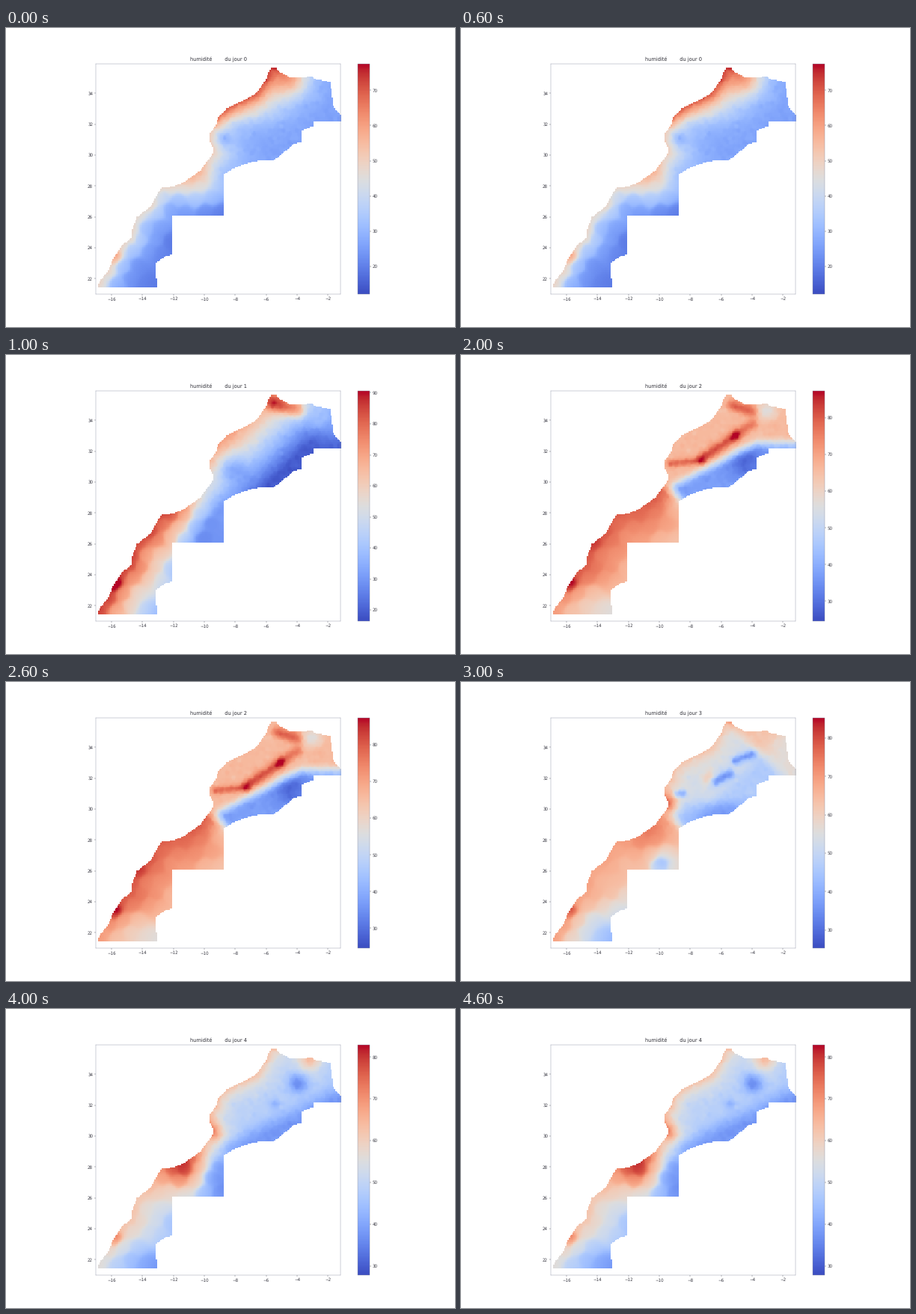
These frames come from a looping animation (600x400 px, 5000 ms). A matplotlib script:

```python
import numpy as np
import matplotlib.pyplot as plt
from matplotlib.animation import FuncAnimation
from matplotlib.path import Path

EXTENT = (-17.02, -1.2, 21.0, 35.9)
LEFT, RIGHT, TOP, BOTTOM = 120, 447, 48, 356   # plot area in stage pixels
CELLS = 205

rng = np.random.default_rng(4)

# Key points of the outline in stage pixels: coast going north, land border back.
COAST = np.array([
    (123, 344), (131, 331), (136, 326), (144, 307), (155, 291), (167, 281),
    (168, 270), (175, 253), (194, 238), (207, 214), (222, 212), (238, 206),
    (259, 191), (276, 168), (276, 160), (272, 153), (272, 140), (280, 131),
    (283, 119), (296, 106), (332, 89), (346, 70), (353, 53), (360, 52)], float)
BORDER = np.array([
    (362, 57), (378, 65.5), (397, 66), (408, 64), (412, 68), (432, 72),
    (437, 106), (448, 118), (448, 124.5), (411, 124.5), (411, 131), (394, 137),
    (395, 152.5), (384, 155), (357, 177.5), (340, 177), (325, 180), (305, 187),
    (291.3, 195), (291.3, 250.5), (222.5, 250.5), (222.5, 303), (212, 306),
    (199, 315), (201.5, 346.5), (124, 346.5)])
OUTLINE = Path(np.vstack([COAST, BORDER]))


def distances(a, b):
    return np.hypot(a[:, None, 0] - b[None, :, 0], a[:, None, 1] - b[None, :, 1])


def ramp(value, low, high):
    t = np.clip((value - low) / (high - low), 0, 1)
    return t * t * (3 - 2 * t)


class Terrain:
    """Points on the map with what the weather depends on there."""

    def __init__(self, pts):
        self.x, self.y = pts.T
        self.across = self.x + self.y              # grows towards the desert
        self.along = self.x - self.y               # grows towards the north-east
        knots = np.arange(len(COAST))
        fine = np.linspace(0, knots[-1], 150)
        shore = np.column_stack([np.interp(fine, knots, c) for c in COAST.T])
        self.coast = distances(pts, shore).min(axis=1)
        self.north = ramp(self.along, 85, 115)
        self.cape = 20 * self.blob(147, 304, 6)

    def blob(self, x, y, r):
        return np.exp(-((self.x - x) ** 2 + (self.y - y) ** 2) / (2 * r * r))

    def ridge(self, x0, y0, x1, y1, width):
        dx, dy = x1 - x0, y1 - y0
        t = ((self.x - x0) * dx + (self.y - y0) * dy) / (dx * dx + dy * dy)
        t = np.clip(t, 0, 1)
        return self.blob(x0 + t * dx, y0 + t * dy, width)

    def join(self, south, north):
        return south + (north - south) * self.north + self.cape


# Each day gives the level in percent of that day's range.
def wet_coast(p):
    south = 3 + 52 * np.exp(-p.coast / 28) + 20 * p.blob(265, 210, 22)
    shore = 72 - 32 * ramp(p.y, 112, 140)
    north = (20 + shore * np.exp(-p.coast / 25) + 28 * p.blob(380, 70, 17)
             - 12 * p.blob(290, 148, 7))
    return p.join(south, north)


def wet_south(p):
    south = np.maximum(92 - 1.05 * p.coast - 42 * ramp(p.x, 215, 270), 17)
    north = (np.maximum(70 - 0.6 * (p.across - 410), 3)
             + 35 * p.ridge(358, 65, 388, 73, 8) + 20 * p.blob(430, 88, 18)
             - 20 * p.blob(300, 150, 14))
    return p.join(south, north)


def wet_mountains(p):
    south = (88 - 0.4 * p.coast - 15 * ramp(p.y, 290, 340)
             + 8 * p.blob(178, 250, 8) - 12 * p.blob(290, 200, 12))
    edge = np.maximum(158 - 0.5 * (p.x - 315), 118)
    dry = ramp(p.y - edge, -12, 12)
    north = (66 - 46 * dry - 14 * p.blob(380, 142, 16)
             + 20 * p.ridge(280, 145, 320, 141, 3.5)
             + 26 * p.ridge(322, 138, 366, 108, 5)
             + 18 * p.ridge(366, 108, 388, 92, 5)
             + 22 * p.ridge(362, 67, 388, 75, 5) - 16 * p.blob(408, 74, 9))
    return p.join(south, north)


def dry_mountains(p):
    south = (72 - (0.25 + 0.5 * ramp(p.y, 270, 330)) * p.coast
             - 28 * p.blob(268, 240, 11) + 10 * p.blob(250, 203, 22))
    north = (45 + 20 * np.exp(-p.coast / 12) + 17 * ramp(p.along, 288, 318)
             - 16 * ramp(p.y, 150, 175) - 10 * ramp(p.across, 480, 515)
             + 32 * p.blob(276, 165, 10) + 14 * p.blob(330, 128, 6)
             - 28 * p.ridge(288, 150, 297, 149, 3)
             - 30 * p.ridge(340, 133, 358, 123, 4.5)
             - 28 * p.ridge(366, 105, 389, 96, 4))
    return p.join(south, north)


def dry_north(p):
    south = (62 - 0.55 * p.coast - 12 * ramp(p.y, 300, 340)
             + 38 * p.blob(238, 211, 23) - 32 * p.blob(284, 218, 21))
    north = (36 + 30 * np.exp(-p.coast / 14)
             - 18 * ramp(p.y + p.x / 2, 310, 345)
             + 18 * p.blob(275, 165, 11) + 28 * p.blob(405, 67, 12)
             - 22 * p.blob(389, 99, 9) - 12 * p.blob(358, 127, 5))
    return p.join(south, north)


# (lowest humidity, highest humidity, rule)
DAYS = [(12.1, 77.5, wet_coast), (16.4, 90.6, wet_south),
        (24.6, 87.3, wet_mountains), (25.3, 85.25, dry_mountains),
        (27.8, 82.9, dry_north)]


def lattice(step, top, bottom):
    """Staggered rows of slightly displaced stations on land."""
    pts = np.array([(x + (row % 2) * step / 2, y)
                    for row, y in enumerate(np.arange(top, bottom, step * 0.87))
                    for x in np.arange(115, 455, step)])
    pts += rng.uniform(-step / 5, step / 5, pts.shape)
    return pts[OUTLINE.contains_points(pts)]


cell = (np.arange(CELLS) + 0.5) / CELLS
gx, gy = np.meshgrid(LEFT + cell * (RIGHT - LEFT), TOP + cell * (BOTTOM - TOP))
grid = np.column_stack([gx.ravel(), gy.ravel()])
inside = OUTLINE.contains_points(grid)
land = grid[inside]

# Dense stations in the north, sparse ones in the south.
stations = np.vstack([lattice(6, 48, 200), lattice(21, 210, 360), COAST])
near = 1 / (distances(land, stations) ** 2 + 4) ** 2.5
near /= near.sum(axis=1, keepdims=True)
speckle = rng.normal(0, 2, len(stations))
land_terrain, station_terrain = Terrain(land), Terrain(stations)


def humidity(low, high, rule):
    local = near @ (rule(station_terrain) + speckle)
    level = np.clip((rule(land_terrain) + local) / 2, 0, 100)
    field = np.full(CELLS * CELLS, np.nan)
    field[inside] = low + level / 100 * (high - low)
    return field.reshape(CELLS, CELLS)


fields = [humidity(*day) for day in DAYS]

plt.rcParams.update({
    "text.hinting": "none", "text.color": "#2b2b33",
    "axes.edgecolor": "#9094a8", "xtick.color": "#55565f",
    "ytick.color": "#55565f", "xtick.labelcolor": "#3a3a44",
    "ytick.labelcolor": "#3a3a44"})
fig, ax = plt.subplots(figsize=(15, 10), dpi=40)
image = ax.imshow(fields[0], cmap="coolwarm", extent=EXTENT,
                  interpolation="nearest")
fig.colorbar(image, ax=ax, ticks=range(0, 101, 10))
title = ax.set_title("")


def update(i):
    low, high, _ = DAYS[i]
    image.set_data(fields[i])
    image.set_clim(low, high)
    title.set_text(f"humidité        du jour {i}")
    return image, title


anim = FuncAnimation(fig, update, frames=len(DAYS), interval=1000,
                     repeat=True, repeat_delay=0, blit=False)
plt.show()
```
